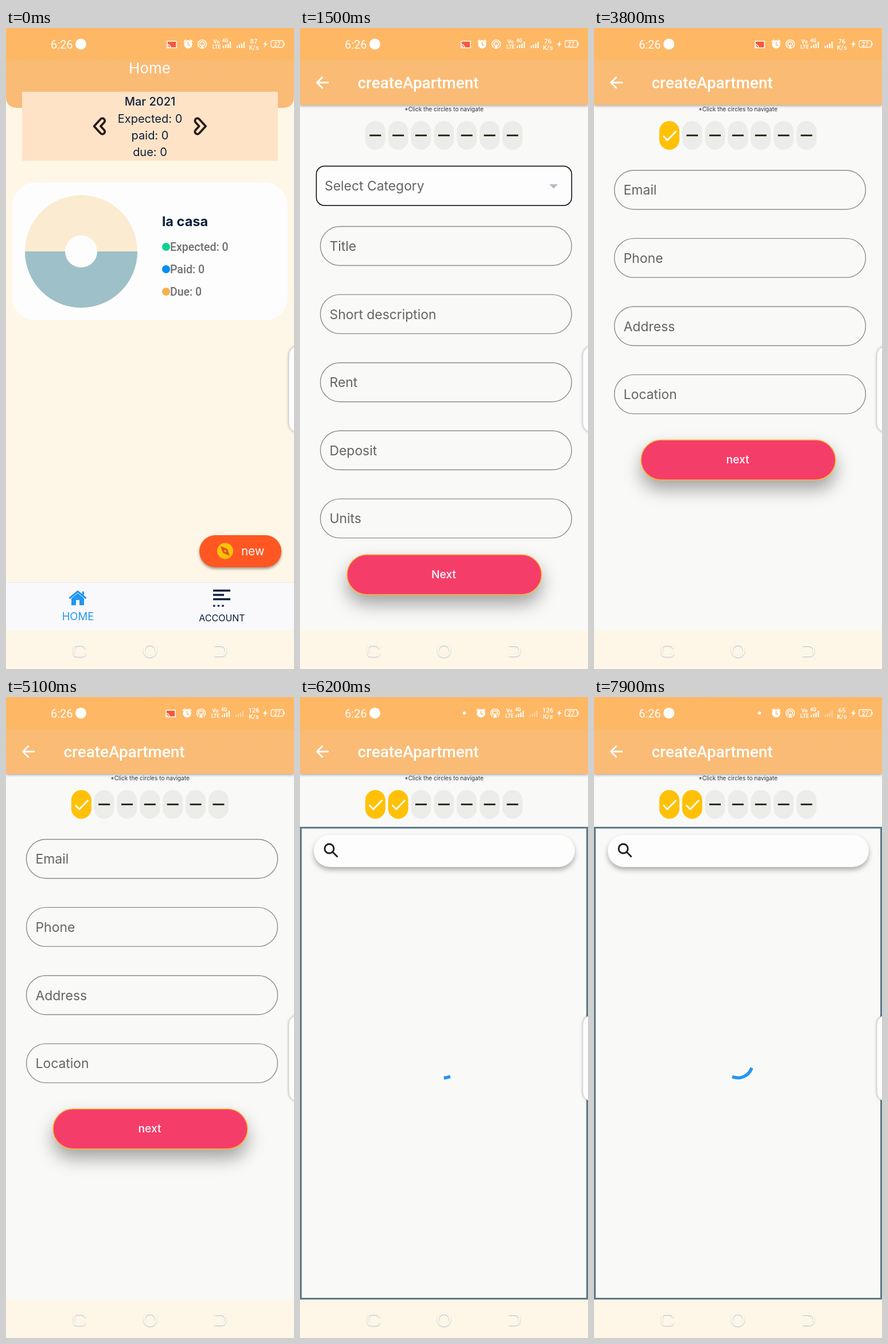
Write an HTML page that moves like this. It is 502 px wide and 1116 px high and loops after 8000 ms.

```html
<!DOCTYPE html>
<html lang="en">
<head>
<meta charset="utf-8">
<title>Rental app</title>
<style>
  html, body { margin: 0; width: 100%; height: 100%; overflow: hidden; background: #fef6e7; }
  svg { display: block; width: 100%; height: 100%; }
  text { font-family: Inter, sans-serif; }
  .roboto text, text.roboto { font-family: Roboto, sans-serif; }
  .mid { text-anchor: middle; }
  .navy { fill: #0d1f3c; }
  .line { fill: none; stroke-linejoin: round; }
  .label { font-size: 22.9px; fill: #646466; }
  .field { fill: none; stroke: #8d8d92; stroke-width: 1.4; }
  .button { fill: #f53d6a; stroke: #ffb627; stroke-width: 1.5; filter: drop-shadow(0 16px 15px rgba(0, 0, 0, .34)); }
  .bar { filter: drop-shadow(0 2px 2px rgba(0, 0, 0, .3)); }
  .fab { fill: #ff5722; filter: drop-shadow(0 3px 2px rgba(0, 0, 0, .35)); }
  .search { fill: #fdfdfd; filter: drop-shadow(0 5px 4px rgba(0, 0, 0, .3)); }
  .handle { fill: #fdfdfd; stroke: #d6d6d6; filter: drop-shadow(0 0 2px rgba(0, 0, 0, .3)); }
  .keys { stroke: #fff; stroke-width: 2; filter: drop-shadow(0 1px 1px rgba(0, 0, 0, .28)); }
</style>
</head>
<body>
<svg viewBox="0 0 502 1116" preserveAspectRatio="none">
  <defs>
    <linearGradient id="orange" gradientUnits="userSpaceOnUse" x1="0" y1="0" x2="0" y2="139">
      <stop offset="0" stop-color="#ffb763"/>
      <stop offset=".4" stop-color="#fdb866"/>
      <stop offset=".4" stop-color="#fabb74"/>
      <stop offset="1" stop-color="#f9bb76"/>
    </linearGradient>
    <path id="chevron" class="line" stroke="#2a1a17" stroke-width="3.8"
      d="M165 158.5L153.5 171L165 183.5A4.2 4.2 0 0 0 171 177.5L165 171L171 164.5A4.2 4.2 0 0 0 165 158.5Z"/>
  </defs>

  <rect width="502" height="1116" fill="#fef6e7"/>

  <g data-on="0 1500">
    <path d="M0 0H502V119Q502 139 482 139H20Q0 139 0 119Z" fill="url(#orange)"/>
    <text class="mid" x="250.5" y="79" font-size="26" fill="#fff">Home</text>
    <rect x="28" y="111" width="446" height="120" fill="#fee3c7"/>
    <g class="mid navy" font-size="20">
      <text x="251" y="135" font-weight="500">Mar 2021</text>
      <text x="251" y="164.5">Expected: 0</text>
      <text x="251" y="194">paid: 0</text>
      <text x="251" y="223">due: 0</text>
    </g>
    <use href="#chevron"/>
    <use href="#chevron" transform="translate(501.6) scale(-1 1)"/>

    <rect x="11" y="269" width="480" height="240" rx="40" fill="#fdfdfd"/>
    <circle cx="131" cy="389" r="98" fill="#fbebd0"/>
    <path d="M33 389A98 98 0 0 0 229 389Z" fill="#9dc0c9"/>
    <circle cx="131" cy="389" r="28" fill="#fdfdfd"/>
    <text class="navy" x="272" y="345" font-size="23.5" font-weight="700">la casa</text>
    <g id="legend" class="roboto" font-size="19.5" font-weight="500"></g>

    <rect class="fab" x="337" y="883" width="143" height="56" rx="28"/>
    <circle cx="382" cy="910.5" r="14" fill="#ffc107"/>
    <path d="M374 902L386 907L390 919L378 914Z" fill="#e0591c"/>
    <circle cx="382" cy="910.5" r="1.6" fill="#ffc107"/>
    <text x="410" y="917.5" font-size="20.5" fill="#fff">new</text>

    <rect y="965" width="502" height="84" fill="#f9f9fb"/>
    <path d="M0 965.5H502" stroke="#e9e9ec"/>
    <g fill="#2196f3">
      <path d="M114 993L125 984L136 993V1005H128V996H122V1005H114Z"/>
      <path class="line" d="M110.5 993L125 981L139.5 993M134.5 981V987" stroke="#2196f3" stroke-width="3"/>
      <text class="mid" x="125.5" y="1031" font-size="18.5">HOME</text>
    </g>
    <path d="M361 979.5H391M361 987H380M361 994.5H391" stroke="#0d1f3c" stroke-width="3.6"/>
    <path d="M361 1006H380" stroke="#0d1f3c" stroke-width="3.2" stroke-dasharray="3.6 4"/>
    <text class="mid navy" x="376.5" y="1032.5" font-size="16">ACCOUNT</text>
  </g>

  <g data-on="1500 8000">
    <rect y="134" width="502" height="915" fill="#f9f9f8"/>
    <rect class="bar" width="502" height="134" fill="url(#orange)"/>
    <path class="line" d="M50 95H30M39.5 85L29.5 95L39.5 105" stroke="#fff" stroke-width="2.8"/>
    <text class="roboto" x="100.5" y="105" font-size="27.9" font-weight="500" fill="#fff">createApartment</text>
    <text class="mid" x="251" y="145" font-size="10.1" fill="#2b2f3a">*Click the circles to navigate</text>
    <g id="steps"></g>
  </g>

  <g data-on="1500 3700">
    <rect x="28.5" y="240.5" width="445" height="68.5" rx="14" fill="#fdfdfd" stroke="#000" stroke-width="1.5"/>
    <text class="label" x="43" y="283">Select Category</text>
    <path d="M434.5 272H449.5L442 279.5Z" fill="#b8b8c6"/>
    <g id="details"></g>
  </g>

  <g data-on="3700 5200" id="contact"></g>

  <g data-on="5200 8000">
    <rect x="1.5" y="227.5" width="499" height="820" fill="none" stroke="#5f7a88" stroke-width="3"/>
    <rect class="search" x="24" y="240" width="455" height="56" rx="28"/>
    <g class="line" stroke="#1e1e1e" stroke-width="2.9">
      <circle cx="51" cy="264" r="8"/>
      <path d="M56.5 269.5L65.5 278.5"/>
    </g>
    <path id="spinner" class="line" stroke="#2196f3" stroke-width="5.6" stroke-linecap="square"/>
  </g>

  <rect class="handle" x="493" y="554" width="40" height="150" rx="16"/>

  <g class="roboto" fill="#fff">
    <text x="78" y="35.5" font-size="20">6:26</text>
    <circle cx="130.5" cy="28" r="9.5"/>
    <g id="icons">
      <g data-on="0 6000">
        <rect x="281" y="23" width="16" height="11.5" fill="#f25a3c" stroke="#fff" stroke-width="1.5"/>
        <path class="line" d="M281 28.5A6 6 0 0 1 287 34.5M281 31.5A3 3 0 0 1 284 34.5" stroke="#fff" stroke-width="1.3"/>
      </g>
      <circle data-on="6000 8000" cx="288.5" cy="28" r="2.8"/>
      <circle cx="317.5" cy="28.5" r="7.2"/>
      <path class="line" d="M310 24L314 20.5M325 24L321 20.5" stroke="#fff" stroke-width="2"/>
      <path class="line" d="M317.5 24V29L321 31" stroke="#fdb766" stroke-width="1.5"/>
      <path class="line" d="M337.5 34A7.4 7.4 0 1 1 346.5 34M339.5 31A4 4 0 1 1 344.5 31" stroke="#fff" stroke-width="1.7"/>
      <path d="M342 27L345.5 36H338.5Z"/>
      <g class="mid" font-weight="700">
        <text x="367" y="26.5" font-size="9">Vo</text>
        <text x="367" y="35.5" font-size="9">LTE</text>
        <text x="382" y="25" font-size="8.5">4G</text>
      </g>
      <path id="signal" d="M379 35V31M383 35V29M387 35V27M391 35V24" stroke="#fff" stroke-width="2.2"/>
      <use id="weak" href="#signal" x="24"/>
    </g>
    <g class="mid" font-size="11.5" font-weight="500">
      <text id="speed" x="432" y="27"></text>
      <text x="432" y="38">K/s</text>
    </g>
    <path d="M454 22L448 29H451.5L450 34L456 27H452.5Z"/>
    <rect class="line" x="462" y="22" width="21.5" height="11.5" rx="3" stroke="#fff" stroke-width="1.3"/>
    <path d="M485 25.5V30.5" stroke="#fff" stroke-width="1.5"/>
    <text class="mid" x="472.8" y="31.5" font-size="10" font-weight="500">27</text>
  </g>

  <g class="keys line">
    <path d="M138 1080Q137 1074.5 132 1074.5H124Q118.5 1074.5 118.5 1080V1088Q118.5 1093.5 124 1093.5H132Q137 1093.5 138 1088"/>
    <circle cx="251" cy="1084" r="10.5"/>
    <path d="M364 1075H374Q383 1075 383 1084T374 1093H364"/>
  </g>
</svg>
<script>
const LOOP = 8000, SPIN_START = 5050, FIRST_DONE = 3700, SECOND_DONE = 5200;
const SPEEDS = [[0, 87], [1000, 76], [4000, 126], [7000, 65]];
const $ = id => document.getElementById(id);

const fields = (top, names) => names.map((name, i) => {
  const y = top + i * 118.6;
  return `<rect class="field" x="35.5" y="${y}" width="438" height="68" rx="34"/>
    <text class="label" x="51.5" y="${y + 42.5}">${name}</text>`;
}).join('');

const button = (y, name) => `<rect class="button" x="82" y="${y}" width="339" height="69.5" rx="34.75"/>
  <text class="mid" x="250.5" y="${y + 41}" font-size="19.3" font-weight="500" fill="#fff">${name}</text>`;

$('details').innerHTML = fields(345.5, ['Title', 'Short description', 'Rent', 'Deposit', 'Units']) + button(917, 'Next');
$('contact').innerHTML = fields(247.8, ['Email', 'Phone', 'Address', 'Location']) + button(717.3, 'next');

$('legend').innerHTML = [['Expected', '#10d090'], ['Paid', '#0090f0'], ['Due', '#f5b050']].map(([name, color], i) =>
  `<circle cx="279" cy="${381 + i * 39}" r="7" fill="${color}"/>
   <text x="286" y="${388 + i * 39}" fill="#706e6e">${name}: 0</text>`).join('');

$('steps').innerHTML = Array.from({ length: 7 }, (_, i) => {
  const done = [FIRST_DONE, SECOND_DONE][i] ?? LOOP;
  const pill = color => `<rect x="-17.5" y="162" width="35" height="50" rx="17.5" fill="${color}"/>`;
  return `<g transform="translate(${131.3 + i * 39.85})">
    <g data-on="0 ${done}">${pill('#ececeb')}<path d="M-10 187H10" stroke="#161c06" stroke-width="2.8"/></g>
    <g data-on="${done} ${LOOP}">${pill('#ffc107')}<path class="line" d="M-10.5 188L-3.5 195.500L12 179.5" stroke="#fff" stroke-width="2.8"/></g>
  </g>`;
}).join('');

const timed = [...document.querySelectorAll('[data-on]')].map(el => [el, ...el.dataset.on.split(' ').map(Number)]);

// cubic-bezier(.4, 0, .2, 1), solved by bisection
function ease(x) {
  if (x <= 0 || x >= 1) return x <= 0 ? 0 : 1;
  let low = 0, high = 1, s;
  for (let i = 0; i < 24; i++) {
    s = (low + high) / 2;
    const bx = 1.2 * (1 - s) ** 2 * s + 0.6 * (1 - s) * s * s + s ** 3;
    if (bx < x) low = s; else high = s;
  }
  return 3 * (1 - s) * s * s + s ** 3;
}

function spinnerPath(elapsed) {
  const phase = elapsed / 1333 % 1;
  const head = ease(phase * 2), tail = ease(phase * 2 - 1);
  const start = Math.PI * (-0.5 + 1.5 * tail + 0.5 * phase + elapsed / 2222 * 2);
  const sweep = Math.max(1.5 * Math.PI * (head - tail), 0.01);
  const point = a => `${251 + 25 * Math.cos(a)} ${638 + 25 * Math.sin(a)}`;
  return `M${point(start)}A25 25 0 ${sweep > Math.PI ? 1 : 0} 1 ${point(start + sweep)}`;
}

function render(t) {
  for (const [el, from, to] of timed) el.style.display = t >= from && t < to ? '' : 'none';
  const speed = SPEEDS.filter(([from]) => t >= from).pop()[1];
  $('speed').textContent = speed;
  $('icons').setAttribute('transform', `translate(${speed > 99 ? -2 : 0})`);
  $('weak').style.opacity = t < 4500 ? 1 : 0.4;
  if (t >= SECOND_DONE) $('spinner').setAttribute('d', spinnerPath(t - SPIN_START));
}

const origin = performance.now();
function tick() {
  render((performance.now() - origin) % LOOP);
  requestAnimationFrame(tick);
}
tick();
</script>
</body>
</html>
```
